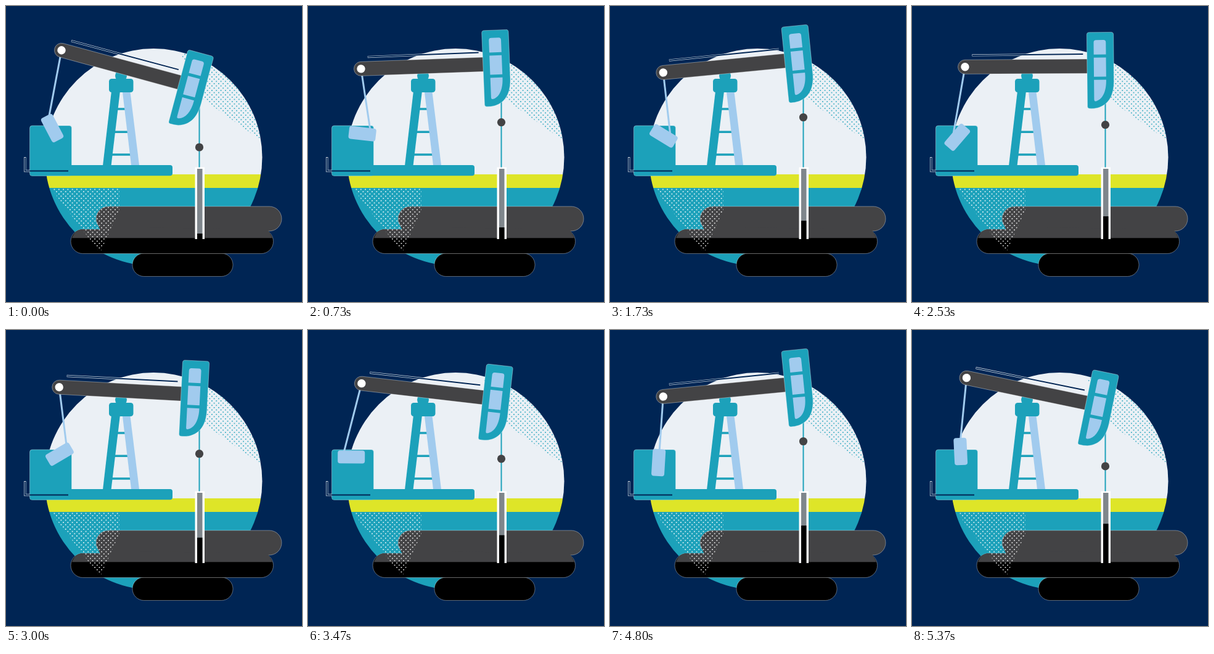
An HTML page for the animation above (5.41 s loop, 480 by 480 pixels).

```html
<!DOCTYPE html>
<html lang="en">
<head>
<meta charset="utf-8">
<title>Oil pump</title>
<style>
html, body { margin: 0; width: 100%; height: 100%; overflow: hidden; background: #002554; }
svg { display: block; width: 100vw; height: 100vh; }
.teal { fill: #1ca1ba; }
.sky { fill: #a1cbee; }
.coal { fill: #434345; }
.edge { stroke: #fff; stroke-opacity: .5; stroke-width: .7; }
.halo { fill: none; stroke: #fff; stroke-opacity: .8; stroke-width: 3.4; }
.navy { fill: none; stroke: #002554; stroke-width: 2; }
</style>
</head>
<body>
<svg viewBox="0 0 480 480">
  <defs>
    <clipPath id="disc"><circle cx="239.3" cy="245.3" r="176.2"/></clipPath>
    <pattern id="tealDots" width="7.3" height="7.3" patternUnits="userSpaceOnUse">
      <g class="teal"><circle cx="1.8" cy="1.8" r=".95"/><circle cx="5.45" cy="5.45" r=".95"/></g>
    </pattern>
    <pattern id="whiteDots" width="7.3" height="7.3" patternUnits="userSpaceOnUse">
      <g fill="#fff"><circle cx="1.8" cy="1.8" r=".95"/><circle cx="5.45" cy="5.45" r=".95"/></g>
    </pattern>
  </defs>
  <rect width="480" height="480" fill="#002554"/>

  <g clip-path="url(#disc)">
    <rect x="60" y="60" width="360" height="214" fill="#ebf0f5"/>
    <rect x="60" y="273" width="360" height="22" fill="#dee528"/>
    <rect class="teal" x="60" y="295" width="360" height="130"/>
    <path d="M282 74L318 150L408 214H420V60H282Z" fill="url(#tealDots)"/>
  </g>

  <!-- underground layers -->
  <rect class="edge" x="205" y="401" width="163" height="37.5" rx="18.7"/>
  <rect class="edge" x="105" y="362" width="328.5" height="39.5" rx="19.7"/>
  <path class="coal" d="M107 376.3Q112 362 125 362H414Q427 362 432 376.3Z"/>
  <rect class="coal edge" x="146" y="325" width="301" height="40" rx="20"/>
  <path class="coal" d="M150 358L156 368H428L424 362Z"/>
  <path d="M73 296H184V330L154 397H150Z" fill="url(#whiteDots)"/>

  <!-- polished rod and well -->
  <path id="cable" fill="none" stroke="#1ca1ba" stroke-width="2"/>
  <circle id="ball" class="coal" cx="313.5" r="6.6"/>
  <rect x="306.5" y="261.5" width="15.5" height="116.5" fill="#fff"/>
  <rect x="310" y="264" width="8.5" height="114" fill="#7f868c"/>
  <rect id="oil" x="310" width="8.5"/>

  <!-- tower and base -->
  <path d="M180 167H195M174 204.3H200M170 241H205" stroke="#1ca1ba" stroke-width="3.4"/>
  <path class="teal" d="M171 138H185L170.5 259H157Z"/>
  <path class="sky" d="M189 140H201.5L216 258H203Z"/>
  <circle class="teal" cx="186.5" cy="113" r="9.5"/>
  <rect class="teal" x="167" y="118" width="39.5" height="22" rx="4.5"/>
  <rect class="teal edge" x="38.5" y="194" width="68" height="81.5" rx="4"/>
  <rect class="teal" x="39" y="258" width="231" height="17.3" rx="4"/>
  <path class="halo" d="M30.8 245V267.5H39"/>
  <path class="navy" d="M30.8 246V267.5H101"/>

  <!-- crank -->
  <path id="link" stroke="#a1cbee" stroke-width="3"/>
  <rect id="weight" class="sky" x="-13" y="-10.5" width="44" height="21" rx="4"/>

  <!-- walking beam -->
  <g id="beam">
    <path class="halo" d="M-89.5 -21H89.5"/>
    <path class="navy" d="M-89 -21H90.5"/>
    <path class="coal edge" d="M-101 -13.7L105 -13V10.3L-101 9.3A11.5 11.5 0 0 1 -101 -13.7Z"/>
    <circle cx="-101" cy="-2.2" r="6.7" fill="#fff"/>
    <g transform="translate(.4 .3)">
      <path class="teal edge" d="M96.5 -52.5Q96.5 -56.5 100.5 -56.5H135.8Q139.8 -56.5 139.8 -52.5V22C139.8 46 131 61 113 66Q106 67.5 100 67Q96.5 67 96.5 63.5Z"/>
      <path class="sky" d="M107.5 -20.5V-40Q107.5 -44 111.5 -44H123.5Q127.3 -44 127.3 -40V-20.5ZM107.5 -15.5H127.3V15.5H107.5ZM107.5 20.5H127.3C127.5 40 121 52 111 55Q107.5 56 107.5 52.5Z"/>
    </g>
  </g>
</svg>
<script>
const LOOP = 5410, BEAT = 600, HOLD = 70, STEP = 530 / 15;
const TURN = 29, LAST = 143;
const pivot = { x: 187, y: 100 }, crank = { x: 79.2, y: 206 };
const rad = Math.PI / 180;
const $ = id => document.getElementById(id);
const set = (id, attrs) => {
  for (const k in attrs) $(id).setAttribute(k, attrs[k]);
};
const polar = (c, r, deg) => ({ x: c.x + r * Math.cos(deg * rad), y: c.y + r * Math.sin(deg * rad) });

// Sixteen poses per beat, the first one held longer
function poseAt(ms) {
  const t = ms % LOOP, beat = Math.floor(t / BEAT), r = t - beat * BEAT;
  const k = r < HOLD ? 0 : Math.min(15, 1 + Math.floor((r - HOLD + 11) / STEP));
  return Math.min(LAST, beat * 16 + k);
}

function draw(n) {
  const p = n % TURN, half = TURN / 2;
  const lift = Math.min(p, TURN - p);
  const tilt = 15 - 1.73 * lift;
  const spin = -(117.6 + 360 * n / TURN);

  const pin = polar(crank, 23, spin);
  const tail = polar(pivot, -101, tilt + 1.25);
  const ballY = 229 - 4.04 * lift;
  // The oil climbs on the upstroke and nearly rests on the downstroke
  const level = 369 - 11 * Math.floor(n / TURN)
    - 9.5 * Math.min(1, p / half) - 1.5 * Math.max(0, p / half - 1);

  set("beam", { transform: `translate(${pivot.x} ${pivot.y}) rotate(${tilt})` });
  set("weight", { transform: `translate(${crank.x} ${crank.y}) rotate(${spin})` });
  set("link", { d: `M${tail.x} ${tail.y}L${pin.x} ${pin.y}` });
  set("cable", { d: `M313.5 ${ballY - 75}V264` });
  set("ball", { cy: ballY });
  set("oil", { y: level, height: 378 - level });
}

const start = performance.now();
function tick() {
  draw(poseAt(performance.now() - start));
  requestAnimationFrame(tick);
}
tick();
</script>
</body>
</html>
```
